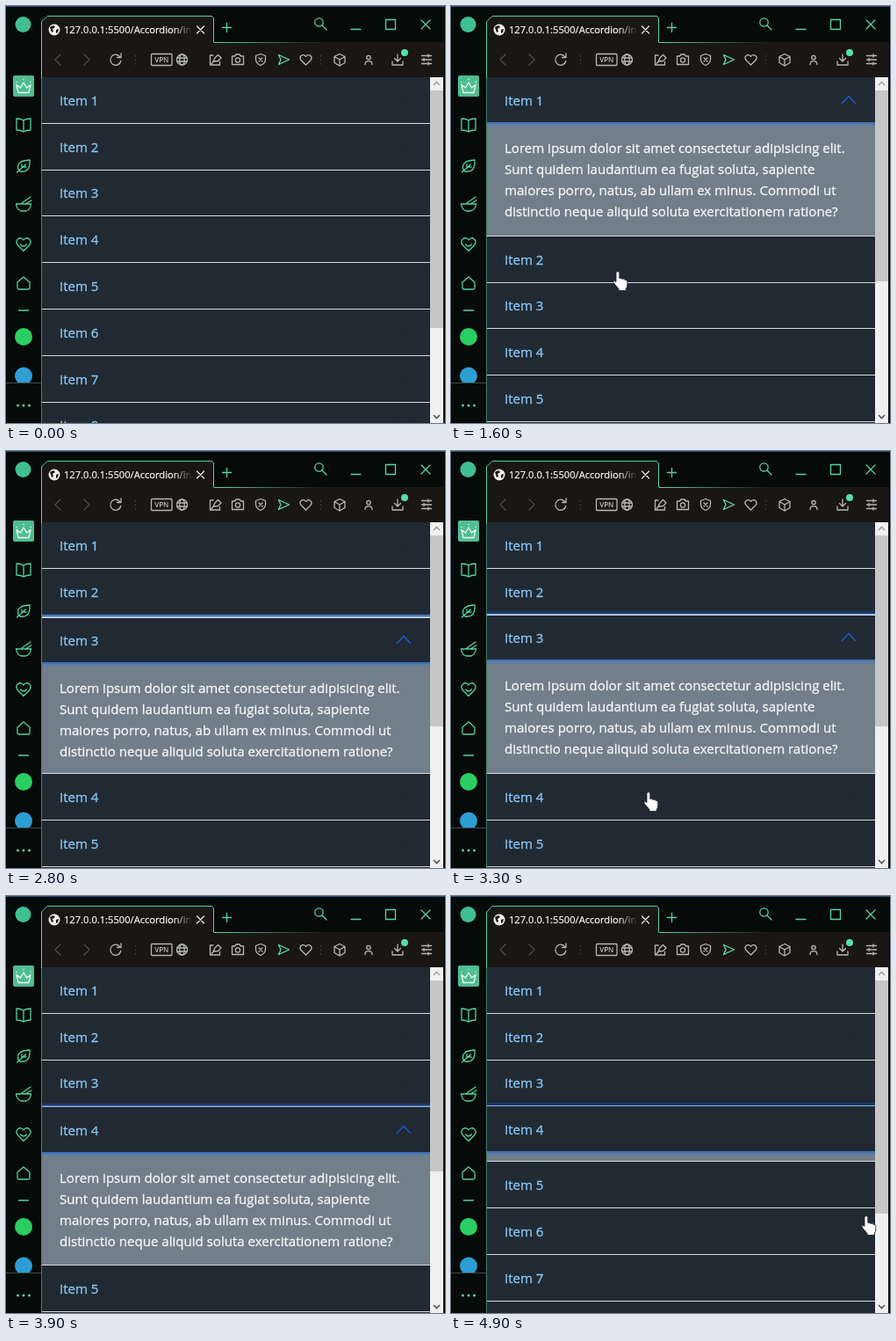
An HTML page that plays this animation: 500 by 474 pixels, repeating every 5 s.

```html
<!DOCTYPE html>
<html lang="en">
<head>
<meta charset="utf-8">
<title>Accordion</title>
<style>
  html, body { margin: 0; width: 100%; height: 100%; overflow: hidden; background: #060b09; }
  svg { display: block; }
  #stage { font-family: "Open Sans", "Noto Sans", sans-serif; }
  .label, .copy { font-size: 15.05px; stroke-width: .3; }
  .label { fill: #8bc8f6; stroke: #8bc8f6; }
  .copy { fill: #f4f6f8; stroke: #f4f6f8; }
  .icon { fill: none; stroke-width: 1.3; stroke-linecap: round; stroke-linejoin: round; }
  .green { stroke: #54d3a0; }
  .gray { stroke: #b6b8b5; }
  .dim { stroke: #4b4a48; }
</style>
</head>
<body>
<svg id="stage" width="500" height="474" viewBox="0 0 500 474">
  <defs>
    <linearGradient id="fadeLine"><stop offset="0" stop-color="#5fd6a4"/><stop offset="1" stop-color="#5fd6a4" stop-opacity="0"/></linearGradient>
    <linearGradient id="fadeText" gradientUnits="userSpaceOnUse" x1="190" x2="212" y1="0" y2="0">
      <stop offset="0" stop-color="#f2f2f2"/><stop offset="1" stop-color="#f2f2f2" stop-opacity="0"/>
    </linearGradient>
    <clipPath id="dock"><path d="M0 0H40V428H0Z"/></clipPath>
  </defs>

  <rect width="500" height="474" fill="#060b09"/>
  <rect x="41" y="41" width="458" height="40" fill="#191614"/>
  <path d="M41 41V18L47 11H234L237 14V41Z" fill="#191614"/>
  <rect width="500" height="1" fill="#29527f"/>
  <path d="M40.500 82V18L47 11.500H234.500L236.500 14V41" class="icon green" style="stroke-width:1"/>
  <path d="M40.500 82V474" stroke="#397f63"/>
  <rect x="237" y="41" width="125" height="1" fill="url(#fadeLine)"/>

  <!-- tab and window controls -->
  <circle cx="55" cy="27" r="6.500" fill="#f0f0f0"/>
  <path d="M50 24l4-2 2 2-3 2 1 3-2 1zM57 27l3-1-1 4-2 1z" fill="#191614"/>
  <text x="66" y="31" font-size="11.150" fill="url(#fadeText)" stroke="url(#fadeText)" stroke-width=".25">127.0.0.1:5500/Accordion/in</text>
  <path class="icon" stroke="#e8e8e8" d="M217.500 23l8 8m0-8l-8 8"/>
  <g class="icon green">
    <path d="M246.500 24.500h10m-5-5v10"/>
    <circle cx="356.500" cy="18.500" r="4.700"/><path d="M360 22l5 5M393 26.500h11M432.500 15.500h11v11h-11zM473 16l10 10m0-10l-10 10"/>
  </g>

  <!-- toolbar -->
  <path class="icon dim" d="M62 55l-6 6 6 6M89 55l6 6-6 6"/>
  <path stroke="#4b4a48" stroke-dasharray="1.500 3" d="M147.500 56v11M358.500 56v11"/>
  <g class="icon gray">
    <path d="M130 58a6 6 0 1 0 .8 4.500M131 54v4.500h-4.500"/>
    <rect x="165.500" y="54.500" width="23.500" height="13" rx="1"/>
    <circle cx="200.500" cy="61" r="6"/><ellipse cx="200.500" cy="61" rx="2.700" ry="6"/><path d="M195 59h11M195 63h11"/>
    <path d="M236 56h-3.500v11h11v-3.500M236 63l2-4 3.500-3.500 3.500 3.500-3.500 3.500zM234 65.500l3-3"/>
    <path d="M257.500 57h3l1.500-2h4l1.500 2h3v9.500h-13z"/><circle cx="264" cy="61.500" r="2.600"/>
    <path d="M290 54.500l5.500 2v4q0 4.500-5.500 7-5.500-2.500-5.500-7v-4zM288 59l4 4m0-4l-4 4"/>
    <path d="M341.500 67l-5.500-5.500c-3-4 2.500-8.500 5.500-4 3-4.500 8.500 0 5.500 4z"/>
    <path d="M380 54.500l6 3v7l-6 3.500-6-3.500v-7zM374 57.500l6 3.500 6-3.500M380 61v7"/>
    <circle cx="413" cy="58.500" r="2.200"/><path d="M409 66.500q0-3.800 4-3.800t4 3.800"/>
    <path d="M446 55v8m-3.500-3.500l3.500 3.500 3.500-3.500M440 63v4h12v-4"/>
    <path d="M473.500 56.500h11M473.500 61h11M473.500 65.500h11M481 55v3M476 59.500v3M481 64v3"/>
  </g>
  <text x="177.300" y="64.300" font-size="8" font-weight="600" fill="#c2c4c1" text-anchor="middle">VPN</text>
  <path class="icon" stroke="#5be0aa" d="M310.500 55.500l12 5.500-12 5.500 2.500-5.500z"/>
  <circle cx="454" cy="53" r="4" fill="#55e0a8"/>

  <!-- sidebar -->
  <circle cx="19.500" cy="21" r="9" fill="#3fbf92"/>
  <rect x="8" y="79" width="24" height="24" rx="2" fill="#4fbd93"/>
  <g class="icon" stroke="#eefaf4">
    <path d="M14 98.500l-2-9 4.500 3.500 3.500-6 3.500 6 4.500-3.500-2 9z"/>
    <path d="M12 86.500h.1M20 83.500h.1M28 86.500h.1"/>
  </g>
  <g class="icon green">
    <path d="M20 130q-3-2-8-2v13q5 0 8 2 3-2 8-2v-13q-5 0-8 2v13"/>
    <path d="M14 186q-3-10 13-11 1 15-11 13zM12.500 189l10-9M18 184v-4M19 183h4"/>
    <path d="M11.500 225h17q-1 7-6 8h-5q-5-1-6-8zM18 224l10-7M22 225l7-4"/>
    <path d="M20 278.500l-6.500-6.500c-4.500-6 3-11.500 6.500-6 3.500-5.500 11 0 6.500 6zM16.500 271q3.500 4 7 0"/>
    <path d="M13 314l7-6 7 6v6.500q0 1.500-1.500 1.500h-11q-1.500 0-1.500-1.500z"/>
    <path d="M14.500 346h11"/>
  </g>
  <circle cx="20" cy="376" r="10" fill="#2bce63"/>
  <circle cx="20" cy="420.500" r="10" fill="#2c9ed4" clip-path="url(#dock)"/>
  <path d="M0 428.500H40" stroke="#3c4a45"/>
  <g fill="#54d3a0"><circle cx="13.500" cy="454" r="1.500"/><circle cx="20" cy="454" r="1.500"/><circle cx="26.500" cy="454" r="1.500"/></g>

  <!-- page -->
  <rect x="41" y="81" width="442" height="393" fill="#212a33"/>
  <g id="page"></g>
  <rect x="483" y="81" width="15" height="393" fill="#f0f0f0"/>
  <rect id="thumb" x="483" y="96" width="15" fill="#c6c6c6"/>
  <path d="M487 90l3.500-3.500 3.500 3.500" fill="none" stroke="#a5a5a5" stroke-width="1.600"/>
  <path d="M487 465l3.500 3.500 3.500-3.500" fill="none" stroke="#555" stroke-width="1.600"/>
  <path id="hand" fill="#fff" stroke="#1a1f24" stroke-width=".8" d="M-2 1.600a1.900 1.900 0 0 1 3.800 0V7.600q2-1 3.200.8 2-.9 3 .9 2.600-.4 2.800 2V15q0 2.500-1.600 4.400V21.500H1V19.600L-4.600 13q-1-1.800.4-2.400 1.200-.4 2.200 1Z"/>
</svg>
<script>
const LOOP = 5000, STEP = 100;
const LEFT = 41, TOP = 80.8, WIDTH = 442, HEADER = 52, PITCH = 52.8, PANEL = 128, COUNT = 10;
// The first four clicks open items 1 to 4; the last closes item 4.
const CLICKS = [1018, 1895, 2515, 3595, 4668];
const POINTER = [
  [400, 478, 332], [500, 435, 227], [600, 385, 137], [700, 363, 110],
  [1400, 363, 110], [1600, 190, 302], [2300, 190, 302], [2500, 212, 346],
  [2900, 212, 346], [3300, 225, 388], [4000, 225, 388], [4200, 440, 273],
  [4600, 440, 273], [4900, 473, 364]
];
const COPY = [
  "Lorem ipsum dolor sit amet consectetur adipisicing elit.",
  "Sunt quidem laudantium ea fugiat soluta, sapiente",
  "maiores porro, natus, ab ullam ex minus. Commodi ut",
  "distinctio neque aliquid soluta exercitationem ratione?"
];

const byId = id => document.getElementById(id);
function set(node, attrs) {
  for (const key in attrs) node.setAttribute(key, attrs[key]);
  return node;
}
function add(parent, tag, attrs, text) {
  const node = set(document.createElementNS("http://www.w3.org/2000/svg", tag), attrs);
  if (text) node.textContent = text;
  return parent.appendChild(node);
}

function bezier(x1, y1, x2, y2) {
  const at = (s, a, b) => 3 * (1 - s) * (1 - s) * s * a + 3 * (1 - s) * s * s * b + s ** 3;
  return x => {
    if (x <= 0) return 0;
    if (x >= 1) return 1;
    let low = 0, high = 1;
    for (let i = 0; i < 24; i++) {
      const mid = (low + high) / 2;
      if (at(mid, x1, x2) < x) low = mid; else high = mid;
    }
    return at(low, y1, y2);
  };
}
const ease = bezier(.25, .1, .25, 1);
const easeInOut = bezier(.42, 0, .58, 1);

const page = byId("page");
const items = Array.from({ length: COUNT }, (_, i) => {
  const group = add(page, "g", {});
  add(group, "text", { class: "label", x: 61, y: 32 }, `Item ${i + 1}`);
  const chevron = add(group, "path", { class: "icon", d: "M-7.5 -4L0 4L7.5 -4" });
  const line = add(group, "rect", { x: LEFT, width: WIDTH, height: 1, fill: "#d3d9de" });
  const panel = add(group, "svg", { x: LEFT, y: HEADER, width: WIDTH, height: 0 });
  add(panel, "rect", { width: WIDTH, height: PANEL, fill: "#727e8a" });
  COPY.forEach((text, n) => add(panel, "text", { class: "copy", x: 20, y: 34 + 24 * n }, text));
  return { group, chevron, line, panel };
});

const ring = add(page, "g", {});
const ringTop = add(ring, "g", {});
const bar = (parent, y, height, fill) => add(parent, "rect", { x: LEFT, y, width: WIDTH, height, fill });
bar(ringTop, -4, 3, "rgba(13,90,230,.3)");
bar(ringTop, -1, 1, "#8db2e2");
bar(ring, HEADER - 1, 2, "#3f70b8");
bar(ring, HEADER + 1, 3, "rgba(13,110,253,.16)");

// Progress of an item's opening minus its closing.
function openness(i, t, duration, curve) {
  return i + 1 < CLICKS.length
    ? curve((t - CLICKS[i]) / duration) - curve((t - CLICKS[i + 1]) / duration)
    : 0;
}

function pointerAt(t) {
  const next = POINTER.findIndex(key => key[0] >= t);
  if (t < POINTER[0][0] || next < 0) return null;
  if (next === 0) return POINTER[0].slice(1);
  const [t0, x0, y0] = POINTER[next - 1], [t1, x1, y1] = POINTER[next];
  const p = (t - t0) / (t1 - t0);
  return [x0 + (x1 - x0) * p, y0 + (y1 - y0) * p];
}

function draw(t) {
  const pointer = pointerAt(t);
  const focus = Math.min(CLICKS.filter(c => t >= c - 50).length - 1, 3);
  let y = TOP, overPanel = false;
  ring.style.display = focus < 0 ? "none" : "";

  items.forEach((item, i) => {
    const height = Math.round(PANEL * openness(i, t, 350, ease));
    const isOpen = t >= CLICKS[i] && t < CLICKS[i + 1];
    const top = Math.round(y);
    set(item.group, { transform: `translate(0 ${top})` });
    set(item.panel, { height });
    item.panel.style.display = height > 0 ? "" : "none";
    set(item.line, { y: HEADER + height });
    set(item.chevron, {
      transform: `translate(453 25.5) rotate(${-180 * openness(i, t, 200, easeInOut)})`,
      stroke: isOpen ? "#175fd2" : "#20282f"
    });
    if (i === focus) {
      set(ring, { transform: `translate(0 ${top})` });
      ringTop.style.display = i ? "" : "none";
    }
    const panelTop = top + HEADER;
    if (pointer && pointer[1] > panelTop && pointer[1] < panelTop + height) overPanel = true;
    y += PITCH + height;
  });

  set(byId("thumb"), { height: Math.round(363 * 393 / (y - TOP)) });
  const hand = byId("hand");
  hand.style.display = pointer && !overPanel ? "" : "none";
  if (pointer) set(hand, { transform: `translate(${pointer[0]} ${pointer[1]})` });
}

const start = performance.now();
function tick() {
  const t = (performance.now() - start) % LOOP;
  draw(Math.floor(t / STEP) * STEP);
  requestAnimationFrame(tick);
}
tick();
</script>
</body>
</html>
```
